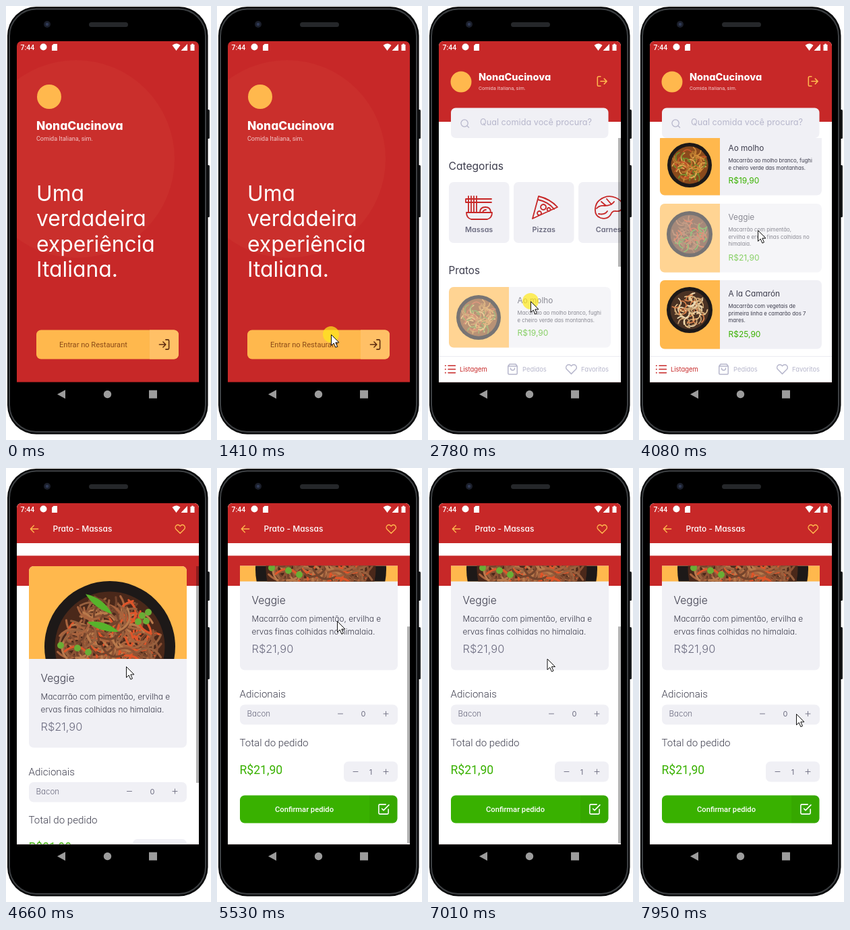
Recreate the animation shown at these times as an HTML page. Size 304 by 641 pixels, loop 8 s.

```html
<!DOCTYPE html>
<html lang="pt-BR">
<head>
<meta charset="utf-8">
<title>Cardápio</title>
<style>
html, body { margin: 0; width: 100%; height: 100%; overflow: hidden; background: #fff; }
svg { display: block; width: 100vw; height: 100vh; }
text { font-family: Inter, "Open Sans", sans-serif; font-feature-settings: "cv11"; white-space: pre; }
.rb { font-family: Roboto, Arial, sans-serif; font-feature-settings: normal; }
.thin { font-weight: 300; }
.ic { fill: none; stroke-linecap: round; stroke-linejoin: round; }
</style>
</head>
<body>
<svg id="stage" viewBox="0 0 304 641" xmlns="http://www.w3.org/2000/svg"></svg>
<script>
const LOOP = 8000;
const RED = '#c72828', ORANGE = '#ffb84d', GREEN = '#39b100';
const INK = '#3d3d4d', SOFT = '#6c6c80', MUTED = '#b7b7cc', CARD = '#f0f0f5';
const BRAND = 'NonaCucinova';

const rect = (x, y, w, h, fill, r = 0, extra = '') =>
  `<rect x="${x}" y="${y}" width="${w}" height="${h}" rx="${r}" fill="${fill}" ${extra}/>`;
const circle = (x, y, r, fill, extra = '') =>
  `<circle cx="${x}" cy="${y}" r="${r}" fill="${fill}" ${extra}/>`;
const text = (s, x, y, size, fill, extra = '') =>
  `<text x="${x}" y="${y}" font-size="${size}" fill="${fill}" ${extra}>${s}</text>`;
const icon = (d, x, y, size, color, weight = 2) =>
  `<path class="ic" d="${d}" transform="translate(${x} ${y}) scale(${size / 24})" stroke="${color}" stroke-width="${weight}"/>`;
const mid = 'text-anchor="middle"', thin = 'class="thin"', roboto = 'class="rb"', light = 'class="rb thin"';

const ICONS = {
  login: 'M15 3h4a2 2 0 0 1 2 2v14a2 2 0 0 1-2 2h-4M10 17l5-5-5-5M15 12H3',
  logout: 'M9 21H5a2 2 0 0 1-2-2V5a2 2 0 0 1 2-2h4M16 17l5-5-5-5M21 12H9',
  search: 'M19 11a8 8 0 1 1-16 0 8 8 0 0 1 16 0zM21 21l-4.3-4.3',
  list: 'M8 5h14M8 12h14M8 19h14M2 5h1M2 12h1M2 19h1',
  bag: 'M6 2L3 6v14a2 2 0 0 0 2 2h14a2 2 0 0 0 2-2V6l-3-4zM3 6h18M16 10a4 4 0 0 1-8 0',
  heart: 'M20.8 4.6a5.5 5.5 0 0 0-7.8 0L12 5.7l-1-1.1a5.5 5.5 0 0 0-7.8 7.8L12 21.2l8.8-8.8a5.5 5.5 0 0 0 0-7.8z',
  back: 'M20 12H4M11 19l-7-7 7-7',
  check: 'M9 11l3 3 10-10M21 12v7a2 2 0 0 1-2 2H5a2 2 0 0 1-2-2V5a2 2 0 0 1 2-2h11'
};

function random(seed) {
  return () => (seed = (seed * 16807) % 2147483647) / 2147483647;
}

// A bowl of noodles: short arcs scattered over a round dark dish.
function bowl(cx, cy, r, tones, seed, count, width = .05) {
  const rnd = random(seed);
  let out = circle(cx, cy, r, '#1d1918') + circle(cx, cy, r * .84, tones[0]);
  for (let i = 0; i < count; i++) {
    const a = rnd() * 6.283, d = Math.sqrt(rnd()) * r * .66, b = rnd() * 6.283;
    const x = cx + Math.cos(a) * d, y = cy + Math.sin(a) * d;
    const dx = Math.cos(b) * r * .18, dy = Math.sin(b) * r * .18;
    const [mx, my, qx, qy, ex, ey] = [x - dx, y - dy, dx - dy, dy + dx, dx * 2, dy * 2].map(v => v.toFixed(1));
    out += `<path class="ic" d="M${mx} ${my}q${qx} ${qy} ${ex} ${ey}" stroke="${tones[1 + i % (tones.length - 1)]}" stroke-width="${(r * width).toFixed(1)}"/>`;
  }
  return out;
}

function home() {
  const lines = ['Uma', 'verdadeira', 'experiência', 'Italiana.'];
  return rect(16, 52, 270, 504, RED) +
    circle(104, 226, 146, '#ca2f2c') +
    circle(64, 134, 18, ORANGE) +
    text(BRAND, 45, 183, 17.4, '#fff', 'font-weight="800"') +
    text('Comida Italiana, sim.', 45, 199, 9, '#f3c9c9', roboto) +
    lines.map((s, i) => text(s, 45, 287.5 + i * 37.5, 31.8, '#fff')).join('') +
    rect(45, 478.5, 211, 43, ORANGE, 7) +
    `<path d="M213 478.5h36a7 7 0 0 1 7 7v29a7 7 0 0 1-7 7h-36z" fill="#ffc066"/>` +
    text('Entrar no Restaurant', 79, 504, 11.1, '#8a4a18', roboto) +
    icon(ICONS.login, 225, 490.5, 19, '#5c2c10') +
    rect(45, 478.5, 211, 43, '#000', 7, 'id="tap" opacity="0"');
}

function dish(i, y, h, name, lines, price, food) {
  return `<g id="dish${i}">` + rect(31, y, 240, h, CARD, 7) +
    `<path d="M120 ${y}H38a7 7 0 0 0-7 7v${h - 14}a7 7 0 0 0 7 7h82z" fill="${ORANGE}"/>` + food +
    text(name, 132.5, y + 24, 11.8, INK) +
    lines.map((s, k) => text(s, 132.5, y + 41 + k * 10.7, 7.8, INK)).join('') +
    text(price, 132.5, y + h - 18, 12, GREEN) + '</g>';
}

function category(x, label, d) {
  return rect(x, 260, 89.5, 90, CARD, 7) +
    `<path class="ic" d="${d}" transform="translate(${x + 24} 279)" stroke="${RED}" stroke-width="1.8"/>` +
    text(label, x + 44.7, 333.5, 10.8, SOFT, `font-weight="600" ${mid}`);
}

function listing() {
  const pasta = 'M5 2v24M9 2v24M13 2v24M17 2v24M1 6h38M1 11h38M1 6v5M2 26h38q0 8-7 10H9q-7-2-7-10zM22 26q0-8 8-8t8 8M26 26q1-4 5-4';
  const pizza = 'M13 2Q30 6 41 18L4 35zM12 7Q27 10 36 21M20 14a4 4 0 1 0 .1 0M14 24a3 3 0 1 0 .1 0M28 19a2.5 2.5 0 1 0 .1 0';
  const meat = 'M7 8Q18-1 31 4q12 5 10 14-1 7-9 6-6-1-8 5-5 8-15 5-9-3-8-14 1-8 6-12zM3 20q4-5 12-4 10 0 14-6M10 10l7 6M18 6l7 8M6 28q9 2 13-4';
  const tab = (name, label, x, tx, color) =>
    icon(ICONS[name], x, 527.5, 18, color) + text(label, tx, 539.5, 9.4, color);
  return rect(16, 52, 270, 504, '#fff') + rect(16, 52, 270, 119, RED) +
    circle(49, 112, 15.5, ORANGE) +
    text(BRAND, 75, 110, 14.5, '#fff', 'font-weight="800"') +
    text('Comida Italiana, sim.', 75, 123.5, 7.5, '#f3c9c9', roboto) +
    icon(ICONS.logout, 249, 102, 18.5, ORANGE) +
    rect(34, 150.5, 233.5, 44.5, CARD, 7) +
    icon(ICONS.search, 47, 166, 15.5, MUTED) +
    text('Qual comida você procura?', 77, 176, 12.7, MUTED) +
    '<g clip-path="url(#listClip)"><g id="list">' +
    text('Categorias', 30.5, 241.5, 15.6, INK) +
    category(31, 'Massas', pasta) + category(127, 'Pizzas', pizza) + category(223, 'Carnes', meat) +
    text('Pratos', 30.5, 395.5, 15.2, INK) +
    dish(0, 415, 89.5, 'Ao molho', ['Macarrão ao molho branco, fughi', 'e cheiro verde das montanhas.'], 'R$19,90',
      bowl(75, 460, 33, ['#8a4a1c', '#d28a36', '#e0ab55', '#c4552a', '#b87a30', '#6f8a2c'], 11, 70)) +
    dish(1, 517, 101.5, 'Veggie', ['Macarrão com pimentão,', 'ervilha e ervas finas colhidas no', 'himalaia.'], 'R$21,90',
      bowl(75, 562, 34, ['#6a3c22', '#a5613a', '#cc4a20', '#8a5230', '#a5613a', '#4f9a2c'], 29, 70)) +
    dish(2, 630, 101.5, 'A la Camarón', ['Macarrão com vegetais de', 'primeira linha e camarão dos 7', 'mares.'], 'R$25,90',
      bowl(75, 674, 34, ['#4a3224', '#e8c48c', '#d9824c', '#f0dcb4', '#c9a070'], 47, 60)) +
    '</g></g>' + rect(282, 195, 4, 190, '#000', 0, 'id="listBar"') +
    rect(16, 517, 270, 39, '#fff') + rect(16, 517, 270, 1, '#ececf2') +
    tab('list', 'Listagem', 24, 47, RED) + tab('bag', 'Pedidos', 116.5, 140, MUTED) + tab('heart', 'Favoritos', 203.5, 227, MUTED);
}

function hero() {
  const pod = (x, y, a) =>
    `<path d="M-24 0Q0-12 25-1Q0 9-24 0z" transform="translate(${x} ${y}) rotate(${a})" fill="#57b32b"/>`;
  const peas = [[202, 218], [211, 213], [208, 226], [196, 227], [106, 266], [122, 272], [81, 262]];
  return '<g clip-path="url(#heroClip)">' +
    bowl(154, 264, 97, ['#4a281a', '#8d5234', '#b97a4c', '#74442c', '#a9643e', '#e0552a', '#98603e'], 83, 260, .032) +
    pod(137, 201, 38) + pod(143, 235, 18) +
    peas.map(p => circle(...p, 5, '#69ad35')).join('') + '</g>';
}

function stepper(y, n, minus, num) {
  return `<path class="ic" d="M${minus} ${y}h7M247 ${y}h7M250.5 ${y - 3.5}v7" stroke="${SOFT}" stroke-width=".9"/>` +
    text(n, num, y + 4, 11, SOFT, mid);
}

function details() {
  return rect(16, 52, 270, 504, '#fff') + rect(16, 52, 270, 59, RED) + rect(16, 129.5, 270, 44.5, RED) +
    icon(ICONS.back, 33.5, 81.5, 17, ORANGE) +
    text('Prato - Massas', 69.5, 94, 12, '#fff', 'font-weight="500"') +
    icon(ICONS.heart, 250, 82, 16.5, ORANGE) +
    '<g clip-path="url(#detailClip)"><g id="detail">' +
    rect(34, 145, 234, 268, CARD, 7, 'id="panel"') +
    `<path d="M34 282V152a7 7 0 0 1 7-7H261a7 7 0 0 1 7 7V282z" fill="${ORANGE}"/>` +
    '<g id="loaded">' + hero() +
    text('Veggie', 51.5, 315.5, 15.6, INK, thin) +
    text('Macarrão com pimentão, ervilha e', 51.5, 341.5, 11.9, INK, thin) +
    text('ervas finas colhidas no himalaia.', 51.5, 360.5, 11.9, INK, thin) +
    text('R$21,90', 51.5, 387.5, 16.4, SOFT, thin) +
    rect(34, 464, 234, 29.5, CARD, 7) + text('Bacon', 44.5, 481.5, 11.6, SOFT, thin) + stepper(477.5, 0, 179.5, 217) + '</g>' +
    text('Adicionais', 33.5, 453.5, 15.1, INK, `id="extras" ${light}`) +
    '<g id="total">' + text('Total do pedido', 33.5, 525, 15.1, INK, light) +
    text('R$21,90', 33.5, 566, 17.6, GREEN, `id="sum" ${roboto}`) +
    rect(188, 548, 80, 30, CARD, 7) + stepper(563, 1, 202, 228) +
    rect(34, 598, 233.5, 41, GREEN, 7) +
    '<path d="M226 598h34.5a7 7 0 0 1 7 7v27a7 7 0 0 1-7 7H226z" fill="#000" opacity=".05"/>' +
    text('Confirmar pedido', 86, 622.5, 11.2, '#fff', `${roboto} font-weight="500"`) +
    icon(ICONS.check, 237.5, 609, 19, '#fff') + '</g></g>' +
    '<ellipse id="glow" cx="151" cy="562" rx="160" ry="34" fill="#777790" opacity="0"/></g>' +
    rect(282, 145, 4, 320, '#000', 0, 'id="detailBar"');
}

function phone() {
  return rect(296, 153, 6, 43, '#1c1e20', 1.5) + rect(296, 235, 6, 77, '#1c1e20', 1.5) +
    rect(2, 1, 297.5, 631.5, '#08090a', 43) +
    rect(5, 4.5, 291, 624.5, '#000', 40, 'stroke="#3c3f42" stroke-width="2"') +
    circle(61, 27, 5, '#1b1f2b') + circle(61, 27, 2.3, '#303a56') +
    rect(123, 24, 58, 7, '#25272a', 3.5) +
    '<g fill="#9c9c9c"><path d="M88 567v13l-12-6.5z"/><circle cx="150.5" cy="573.5" r="5.7"/><rect x="212" y="567.5" width="12" height="12"/></g>';
}

function status() {
  return text('7:44', 21.5, 64.8, 10.5, '#fff', `${roboto} font-weight="500"`) +
    circle(55.5, 60.5, 5, '#fff') +
    '<path fill="#fff" d="M70.5 56h5.5v10h-8v-7.5zM246.5 58q6-5 12 0l-6 8zM269 56v10h-9.5zM273.5 57h1.7v-1.3h2.6V57h1.7v9h-6z"/>';
}

const stage = document.getElementById('stage');
stage.innerHTML = `<defs>
  <clipPath id="screenClip"><path d="M16 555.5V59a7 7 0 0 1 7-7H279a7 7 0 0 1 7 7V555.5z"/></clipPath>
  <clipPath id="listClip"><rect x="16" y="195" width="270" height="322"/></clipPath>
  <clipPath id="detailClip"><rect x="16" y="144.5" width="270" height="411.5"/></clipPath>
  <clipPath id="heroClip"><rect x="34" y="145" width="234" height="137"/></clipPath></defs>` +
  phone() + `<g clip-path="url(#screenClip)">${home()}<g id="listing">${listing()}</g><g id="details">${details()}</g>${status()}</g>` +
  `<g id="cursor">${circle(0, 0, 12, '#ffe81a', 'id="touch" opacity=".7"')}
  <path d="M.5 .5V16.5l3.7-3.5 2.7 6.2 2.6-1.2-2.7-6H12z" fill="#fff" stroke="#111" stroke-width="1"/></g>`;

const el = {};
stage.querySelectorAll('[id]').forEach(n => el[n.id] = n);

// time, x, y of the pointer tip
const PATH = [
  [540, 246, 640], [900, 190, 510], [1080, 172, 462], [1280, 169, 485], [1740, 169, 485],
  [2300, 141, 372], [2580, 152, 436], [2780, 152, 436], [3100, 160, 300], [3420, 165, 300],
  [3560, 176, 331], [4300, 176, 331], [4660, 178, 293], [4930, 178, 340], [5050, 178, 340],
  [5450, 178, 226], [5780, 178, 226], [5950, 178, 340], [6270, 181, 210], [6500, 180, 162],
  [6880, 180, 162], [7050, 176, 300], [7390, 171, 234], [7670, 171, 234], [7950, 233, 363]
];
const TOUCH = [[1410, 1510], [2640, 3100], [3600, 4080], [5000, 5450], [5980, 6550], [7060, 7390]];

const ramp = (t, a, b) => Math.min(1, Math.max(0, (t - a) / (b - a)));
const smooth = p => p * p * (3 - 2 * p);
const easeOut = p => 1 - (1 - p) ** 3;
const pulse = (t, a, b, c, d) => ramp(t, a, b) - ramp(t, c, d);
const set = (n, k, v) => n.setAttribute(k, v);
const show = (n, on) => set(n, 'display', on ? 'inline' : 'none');
const move = (n, x, y) => set(n, 'transform', `translate(${x.toFixed(2)} ${y.toFixed(2)})`);

function pointer(t) {
  const i = PATH.findIndex(p => p[0] > t);
  if (i < 0) return PATH[PATH.length - 1].slice(1);
  if (i === 0) return PATH[0].slice(1);
  const [t0, x0, y0] = PATH[i - 1], [t1, x1, y1] = PATH[i];
  const p = smooth(ramp(t, t0, t1));
  return [x0 + (x1 - x0) * p, y0 + (y1 - y0) * p];
}

function enter(node, t, start) {
  const p = easeOut(ramp(t, start, start + 350));
  set(node, 'opacity', p);
  show(node, p > 0);
  move(node, 0, 40 * (1 - p));
}

function draw(t) {
  move(el.cursor, ...pointer(t));
  show(el.cursor, t >= 540);
  show(el.touch, TOUCH.some(([a, b]) => t >= a && t < b));
  set(el.tap, 'opacity', .08 * pulse(t, 1420, 1450, 1470, 1510));

  enter(el.listing, t, 1740);
  const listY = 225 * easeOut(ramp(t, 2800, 3370));
  move(el.list, 0, -listY);
  move(el.listBar, 0, listY * 190 / 322);
  set(el.listBar, 'opacity', .3 * pulse(t, 2580, 2620, 3480, 3750));
  set(el.dish0, 'opacity', 1 - .4 * pulse(t, 2660, 2770, 2830, 2980));
  set(el.dish1, 'opacity', 1 - .4 * pulse(t, 3600, 3750, 4090, 4250));

  enter(el.details, t, 4120);
  const ready = t >= 4540;
  show(el.loaded, ready);
  set(el.panel, 'height', ready ? 268 : 243);
  set(el.extras, 'y', ready ? 453.5 : 430.5);
  move(el.total, 0, ready ? 0 : -57);
  el.sum.textContent = ready ? 'R$21,90' : 'R$NaN';

  const detailY = 114.5 * smooth(ramp(t, 5050, 5450));
  move(el.detail, 0, -detailY);
  move(el.detailBar, 0, detailY * 320 / 411);
  set(el.detailBar, 'opacity', .3 * (pulse(t, 4540, 4560, 4700, 4830) + pulse(t, 4980, 5030, 7670, 7950)));
  set(el.glow, 'opacity', .07 * (pulse(t, 6020, 6240, 6450, 6680) + pulse(t, 7080, 7220, 7290, 7390)));
}

const began = performance.now();
function tick(now) {
  draw(Math.max(0, now - began) % LOOP);
  requestAnimationFrame(tick);
}
draw(0);
requestAnimationFrame(tick);
</script>
</body>
</html>
```
